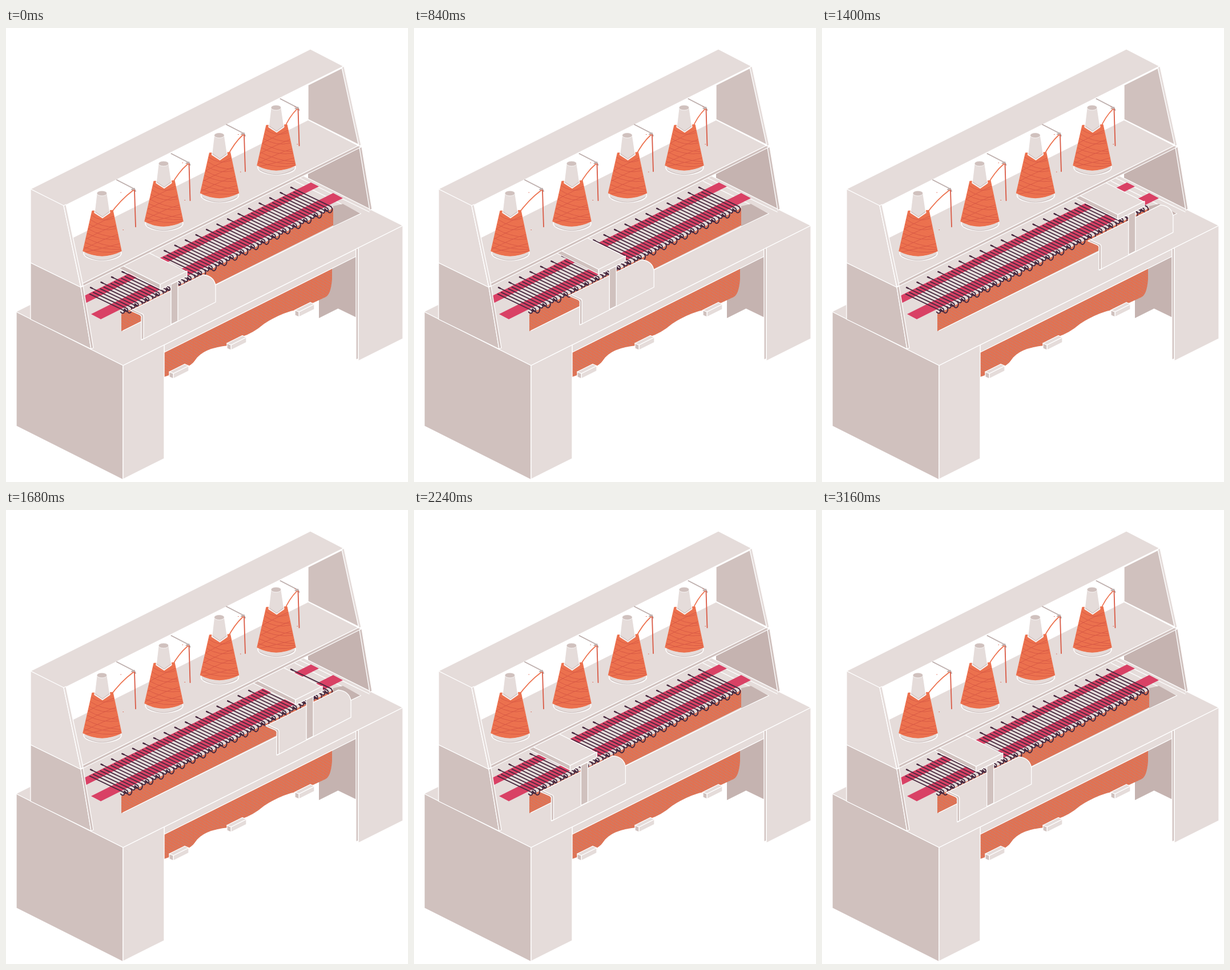
Write an HTML page that moves like this. It is 704 by 795 pixels and loops after 3480 ms.

```html
<!DOCTYPE html>
<html lang="en">
<head>
<meta charset="utf-8">
<title>Knitting machine</title>
<style>
  html, body { margin: 0; width: 100%; height: 100%; overflow: hidden; background: #fff; }
  svg { display: block; width: 100%; height: 100%; }
</style>
</head>
<body>
<svg id="stage" viewBox="0 0 704 795" fill="none" stroke-linecap="round" stroke-linejoin="round"></svg>
<script>
const LIGHT = '#e5dcda', MID = '#d0c1be', DARK = '#c5b3b0';
const CRIMSON = '#d94165', ORANGE = '#ed7350', RUST = '#d95a45', INK = '#47293f', METAL = '#bdaeac';

const shape = (d, fill, edge = '#fff', width = 1.3) =>
  `<path d="${d}" fill="${fill}" stroke="${edge}" stroke-width="${width}"/>`;
const line = (d, color = '#fff', width = 1.3) => shape(d, 'none', color, width);

// Parallelogram spanned by two vectors.
const quad = (x, y, [ax, ay], [bx, by], fill, edge) =>
  shape(`M${x} ${y}l${ax} ${ay}l${bx} ${by}l${-ax} ${-ay}z`, fill, edge);
// Parallelogram whose first side follows the machine's long axis.
const slab = (x, y, length, dx, dy, fill, edge) =>
  quad(x, y, [length, -length / 2], [dx, dy], fill, edge);

const defs = `<defs>
  <pattern id="knit" width="4.6" height="5" patternUnits="userSpaceOnUse" patternTransform="skewY(-26.5)">
    <rect width="4.6" height="5" fill="#e66f4d"/>
    <path d="M.8 .6v1.5M3.1 3.1v1.5" stroke="#bd8478" stroke-width="1.2"/>
  </pattern>
  <clipPath id="yarn"><path d="M-17 31L-33 101Q0 118 34 101L19 30Z"/></clipPath>
</defs>`;

const clip = (x, y) =>
  slab(x + 7, y + 3, 27, 0, 9, LIGHT) +
  quad(x, y, [7, 3], [0, 9], MID) +
  slab(x, y, 27, 7, 3, LIGHT);

function underside() {
  const cloth = 'M277 560L571 412V440Q569 466 560 471L515 492Q482 498 452 518Q432 535 412 541' +
    'L390 556Q345 560 331 582Q322 596 277 611Z';
  return quad(548, 418, [66, -33], [0, 90], DARK, 'none') +
    shape('M548 450V475L614 507V450Z', DARK, 'none') +
    shape(cloth, 'url(#knit)', 'none') +
    clip(286, 602) + clip(387, 552) + clip(506, 494) +
    slab(277, 555, 336, 0, 13, LIGHT);
}

function table() {
  return shape('M529 254L619 208L637 320L529 268Z', DARK, 'none') +
    slab(17, 497, 490, 188, 94, LIGHT) +
    quad(18, 497, [187, 94], [0, 200], MID) +
    slab(205, 591, 72, 0, 199, LIGHT) +
    slab(613, 387, 4, 0, 194, MID) +
    slab(617, 385, 78, 0, 198, LIGHT) +
    line('M506 268L621 325M513 262L636 322');
}

function needleBed() {
  const perGroup = 3, gap = 18.47 / perGroup, count = 60, length = 70;
  let needles = '', tips = '', hooks = '';
  for (let i = 0; i < count; i++) {
    const x = 499 - i * gap, y = 279 + i * gap / 2;
    const start = i % perGroup ? 11 : 0;
    const endX = x + length, endY = y + length * 0.48;
    if (endX < 198) break;
    needles += `M${x + start} ${y + start * 0.48}L${endX} ${endY}`;
    if (start) {
      hooks += `M${endX} ${endY}q3 3 0 5q-3 1 -5 -2`;
    } else {
      tips += `M${x} ${y}l3 1.4`;
      hooks += `M${endX} ${endY}q4 4 1 9q-3 4 -6 0l-6 -5`;
    }
  }
  return shape('M573 312L590 308L621 325L573 349Z', DARK, 'none') +
    slab(125, 475, 409, 14, 7, CRIMSON, 'none') +
    slab(149, 501, 424, 17, 9, CRIMSON, 'none') +
    slab(202, 501, 371, 0, 30, 'url(#knit)', 'none') +
    line('M205 530L573 348L621 325') +
    line(needles, INK, 1.8) + line(tips, INK, 2.5) + line(hooks, INK, 1.9);
}

function carriage() {
  return `<g id="carriage">` +
    shape('M218 495L345 432Q364 434 367 451V480L238 546V508Q240 502 234 501Z', LIGHT) +
    shape('M218 495L234 502Q238 504 237 508V546L241 544V505Q241 501 237 500L222 493Z', MID) +
    slab(289, 449, 12, 0, 70, MID) +
    quad(194, 411, [47, -22], [76, 38], LIGHT) +
    quad(194, 411, [76, 38], [0, 8], MID) +
    slab(270, 449, 47, 0, 9, LIGHT) + `</g>`;
}

function frame() {
  return shape('M529 100L589 70L619 205L529 160Z', MID) +
    slab(43, 404, 486, 88, 45, LIGHT) +
    slab(131, 449, 489, 0, 5, MID) +
    slab(43, 282, 490, 58, 30, LIGHT) +
    slab(588, 69, 4, 30, 138, LIGHT) +
    slab(619, 210, 4, 18, 109, MID) +
    shape('M43 411L131 454L149 562L43 510Z', MID) +
    slab(131, 454, 4, 18, 108, MID) +
    shape('M43 282L101 311L131 454L43 411Z', LIGHT) +
    slab(101, 311, 4, 30, 142, LIGHT);
}

function spool(x, y) {
  const half = v => 17 + (v - 31) * 0.235;
  let fine = '', wraps = '';
  for (let v = 36; v < 112; v += 3) fine += `M${-half(v)} ${v - 6}Q0 ${v + 7} ${half(v)} ${v - 6}`;
  for (let i = 0; i < 8; i++) {
    const a = 38 + i * 8, b = a + 6 + (i * 7) % 12;
    wraps += `M${-half(a)} ${a}Q0 ${a + 14} ${half(b)} ${b}`;
    if (i % 2) wraps += `M${half(a)} ${a - 6}Q2 ${a + 2} ${-half(b)} ${b + 3}`;
  }
  return `<g transform="translate(${x} ${y})">
    <ellipse cx="1" cy="105" rx="33" ry="12.5" fill="${LIGHT}" stroke="#fff" stroke-width="1.5"/>` +
    line('M-29 109Q1 126 31 108', METAL, 0.8) +
    shape('M-17 31L-33 101Q0 118 34 101L19 30Z', ORANGE, ORANGE) +
    `<g clip-path="url(#yarn)">${line(fine, '#e86c4b', 0.8)}${line(wraps, RUST, 1)}</g>` +
    shape('M-9 0H9L14 34L1 43L-13 34Z', LIGHT) +
    line('M-12 32L1 41L13 32', METAL, 0.7) +
    `<ellipse rx="9" ry="4.5" fill="${MID}" stroke="#fff" stroke-width=".8"/></g>`;
}

// Yarn runs from the spool to the tip of a rod and hangs down from it.
function feeder(x, y, tipX, tipY) {
  return line(`M${tipX - 31} ${tipY - 16}L${tipX} ${tipY}l2 4l-7 -3l5 -2`, METAL, 1.9) +
    line(`M${x + 14} ${y + 37}Q${(x + tipX) / 2 + 4} ${(y + tipY) / 2 + 15} ${tipX - 2} ${tipY + 2}`, ORANGE, 1.7) +
    line(`M${tipX} ${tipY + 2}l2 64`, RUST, 1.8) +
    line(`M${x + 33} ${y - 1.5}h.5M${x + 37} ${y + 64}h.5`, RUST, 1.2);
}

const spools = [[168, 289.5, 225, 282], [276, 237.5, 320.5, 236], [373.5, 188, 417, 185], [473, 139.5, 511.5, 140]]
  .map(([x, y, tipX, tipY]) => spool(x, y) + feeder(x, y, tipX, tipY)).join('');

document.getElementById('stage').innerHTML =
  defs + underside() + table() + needleBed() + carriage() + frame() + spools;

const LOOP = 3480, TICK = 40, GLIDE = 0.493;
const smooth = p => p * p * (3 - 2 * p);

// Time and carriage offset at each stop.
const stops = [[560, 0], [1520, 259], [2505, -52], [2600, -43.5], [2800, -36.5], [3180, 0]];

function offsetAt(t) {
  const next = stops.findIndex(([time]) => t < time);
  if (next < 1) return 0;
  const [start, from] = stops[next - 1], [end, to] = stops[next];
  return from + (to - from) * smooth((t - start) / (end - start));
}

const sled = document.getElementById('carriage');
const began = performance.now();

function tick() {
  const t = Math.floor(((performance.now() - began) % LOOP) / TICK) * TICK;
  const dx = t < 600 ? 0 : offsetAt(t);
  sled.setAttribute('transform', `translate(${dx.toFixed(2)} ${(-dx * GLIDE).toFixed(2)})`);
  requestAnimationFrame(tick);
}
tick();
</script>
</body>
</html>
```
